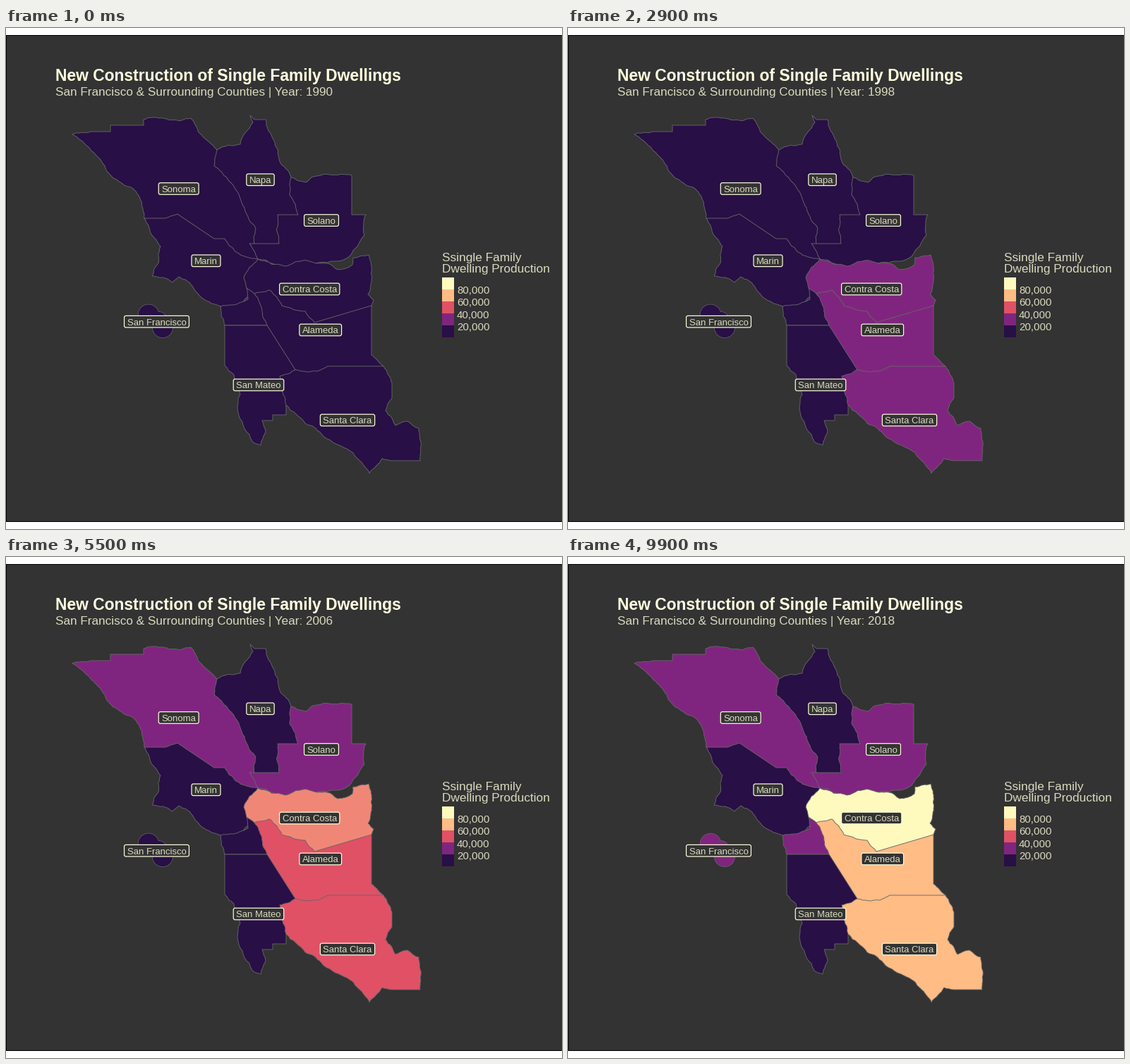
Write a matplotlib script that moves like this. It is 788 px wide and 711 px high and loops after 10 s.

```python
import numpy as np
import matplotlib.pyplot as plt
from matplotlib.animation import FuncAnimation
from matplotlib.patches import Circle, FancyBboxPatch, Polygon, Rectangle

W, H, DPI = 788, 711, 64
PT = 72 / DPI  # points per pixel
FRAMES = 100
FIRST, LAST = 1990, 2018

BG, INK, SOFT, EDGE = "#333333", "#ffffe0", "#d9d9be", "#666666"
BINS = ["#280f46", "#80257f", "#e05166", "#ffbc85", "#fefabe"]
RGB = np.array([[int(c[i:i + 2], 16) / 255 for i in (1, 3, 5)] for c in BINS])

rng = np.random.default_rng(4)


def wander(a, b):
    """Points from a up to b along a natural, slightly rough line."""
    d = b - a
    length = np.hypot(*d)
    if length < 5:
        return [a]
    normal = np.array([-d[1], d[0]])
    mid = (a + b) / 2 + normal * rng.uniform(-0.09, 0.09)
    return wander(a, mid) + wander(mid, b)


def outline(*corners):
    """Closed border: surveyed lines (level, upright or long) stay straight."""
    pts = np.array(corners, float)
    ring = []
    for a, b in zip(pts, np.roll(pts, -1, axis=0)):
        straight = (a == b).any() or np.hypot(*(b - a)) > 60
        ring += [a] if straight else wander(a, b)
    return ring


# Drawn in this order: each county overlaps the earlier ones and so sets
# the border it shares with them.
COUNTIES = {
    "Sonoma": outline(
        (196, 270), (183, 231), (152, 213), (117, 169), (94, 151), (120, 147),
        (148, 147), (148, 138), (195, 138), (195, 130), (207, 127), (262, 128),
        (287, 161), (299, 173), (350, 230), (370, 335), (240, 300)),
    "Napa": outline(
        (299, 173), (295, 195), (330, 236), (354, 285), (352, 306), (400, 312),
        (425, 250), (404, 212), (380, 160), (368, 130), (352, 130), (346, 124),
        (350, 134), (332, 165)),
    "Solano": outline(
        (345, 306), (387, 306), (385, 265), (414, 265), (402, 237), (404, 212),
        (425, 219), (435, 211), (458, 208), (490, 209), (490, 265), (510, 265),
        (508, 294), (487, 324), (469, 331), (455, 333), (400, 350), (357, 328)),
    "Marin": outline(
        (357, 328), (326, 318), (310, 299), (295, 299), (243, 264), (222, 270),
        (196, 270), (219, 310), (207, 352), (236, 361), (245, 353), (279, 384),
        (304, 395), (330, 405), (355, 365)),
    "San Francisco": outline(
        (304, 395), (322, 393), (343, 385), (341, 369), (365, 372), (390, 422),
        (310, 422)),
    "San Mateo": outline(
        (310, 422), (390, 422), (420, 475), (410, 535), (397, 535), (397, 549),
        (378, 549), (378, 557), (363, 557), (368, 573), (361, 592), (349, 587),
        (330, 550), (332, 520), (323, 492), (310, 479)),
    "Contra Costa": outline(
        (357, 328), (396, 338), (427, 330), (455, 334), (470, 343), (491, 336),
        (492, 326), (514, 322), (517, 365), (513, 378), (521, 386), (518, 394),
        (480, 430), (400, 430), (352, 377), (341, 369), (337, 355)),
    "Alameda": outline(
        (352, 377), (374, 372), (391, 394), (424, 402), (437, 418), (518, 394),
        (518, 464), (535, 480), (500, 500), (430, 500), (410, 485), (370, 422)),
    "Santa Clara": outline(
        (410, 485), (442, 487), (456, 480), (535, 480), (547, 504), (547, 525),
        (538, 543), (552, 564), (569, 558), (585, 568), (587, 614), (546, 614),
        (533, 611), (515, 632), (480, 596), (447, 576), (424, 561), (397, 535),
        (388, 494)),
}

LABELS = {
    "Sonoma": (244.7, 228), "Napa": (360.5, 215.3), "Solano": (447, 273),
    "Marin": (283.5, 330.3), "Contra Costa": (430.2, 370.5),
    "San Francisco": (213.5, 416.7), "Alameda": (445.7, 428.5),
    "San Mateo": (358, 506.5), "Santa Clara": (484, 556.5),
}

# Years in which a county reaches its next colour bin
STEPS = {
    "Sonoma": [2000],
    "Solano": [2002],
    "San Francisco": [2009],
    "Contra Costa": [1996, 2002, 2006, 2016],
    "Alameda": [1998, 2005, 2017],
    "Santa Clara": [1997, 2004, 2015],
}

fig = plt.figure(figsize=(W / DPI, H / DPI), dpi=DPI, facecolor="white")
ax = fig.add_axes([0, 0, 1, 1])
ax.set_xlim(0, W)
ax.set_ylim(H, 0)
ax.axis("off")


def box(x, y, w, h, color):
    ax.add_patch(Rectangle((x, y), w, h, fc=color, lw=0))


def write(x, y, s, px, color=SOFT, **kw):
    return ax.text(x, y, s, fontsize=px * PT, color=color,
                   family="Liberation Sans", va="baseline", zorder=6, **kw)


# Panel with a one-pixel black frame, open on the right
box(0, 10, W, 691, "black")
box(1, 11, W, 689, BG)

fills = {}
for name, ring in COUNTIES.items():
    shape = Polygon(ring, ec=EDGE, lw=0.9 * PT, joinstyle="round", zorder=2)
    fills[name] = [ax.add_patch(shape)]

# Offshore islands: outlines below, plain fills above
for x, y, r in [(202, 407, 14.5), (217, 413, 10), (222, 425, 14.3)]:
    ax.add_patch(Circle((x, y), r, fc="none", ec=EDGE, lw=1.4 * PT, zorder=2))
    fills["San Francisco"].append(ax.add_patch(Circle((x, y), r, lw=0, zorder=3)))

for name, (x, y) in LABELS.items():
    text = write(x, y + 4.8, name, 13.1, ha="center")
    w = text.get_window_extent().width + 8
    ax.add_patch(FancyBboxPatch((x - w / 2, y - 8.3), w, 16.6, fc=BG, ec=INK,
                                boxstyle="round,pad=0,rounding_size=2.5",
                                lw=1.2 * PT, zorder=5))

write(70, 75.5, "New Construction of Single Family Dwellings", 22.9, INK, weight="bold")
subtitle = write(70, 96, "", 17.1)

write(618.5, 330.5, "Ssingle Family", 17.2)
write(618.5, 347, "Dwelling Production", 17.3)
for i, color in enumerate(reversed(BINS)):
    box(618, 354 + 17 * i, 17, 17, color)
    if i < 4:
        write(639, 377.3 + 17.2 * i, f"{80 - 20 * i},000", 15)


def key(year):
    """Frame on which a whole year's data is shown."""
    return round((year - FIRST) * (FRAMES - 1) / (LAST - FIRST))


def shade(name, i):
    level = 0
    for year in STEPS.get(name, []):
        a, b = key(year - 1), key(year)
        level += min(max((i - a) / (b - a), 0), 1)
    low = min(int(level), len(BINS) - 2)
    return RGB[low] + (RGB[low + 1] - RGB[low]) * (level - low)


def draw(i):
    year = round(FIRST + (LAST - FIRST) * i / (FRAMES - 1))
    subtitle.set_text(f"San Francisco & Surrounding Counties | Year: {year}")
    for name, patches in fills.items():
        for p in patches:
            p.set_facecolor(shade(name, i))
    return [subtitle]


anim = FuncAnimation(fig, draw, frames=FRAMES, interval=100, repeat=True,
                     repeat_delay=0, blit=False)
plt.show()
```
